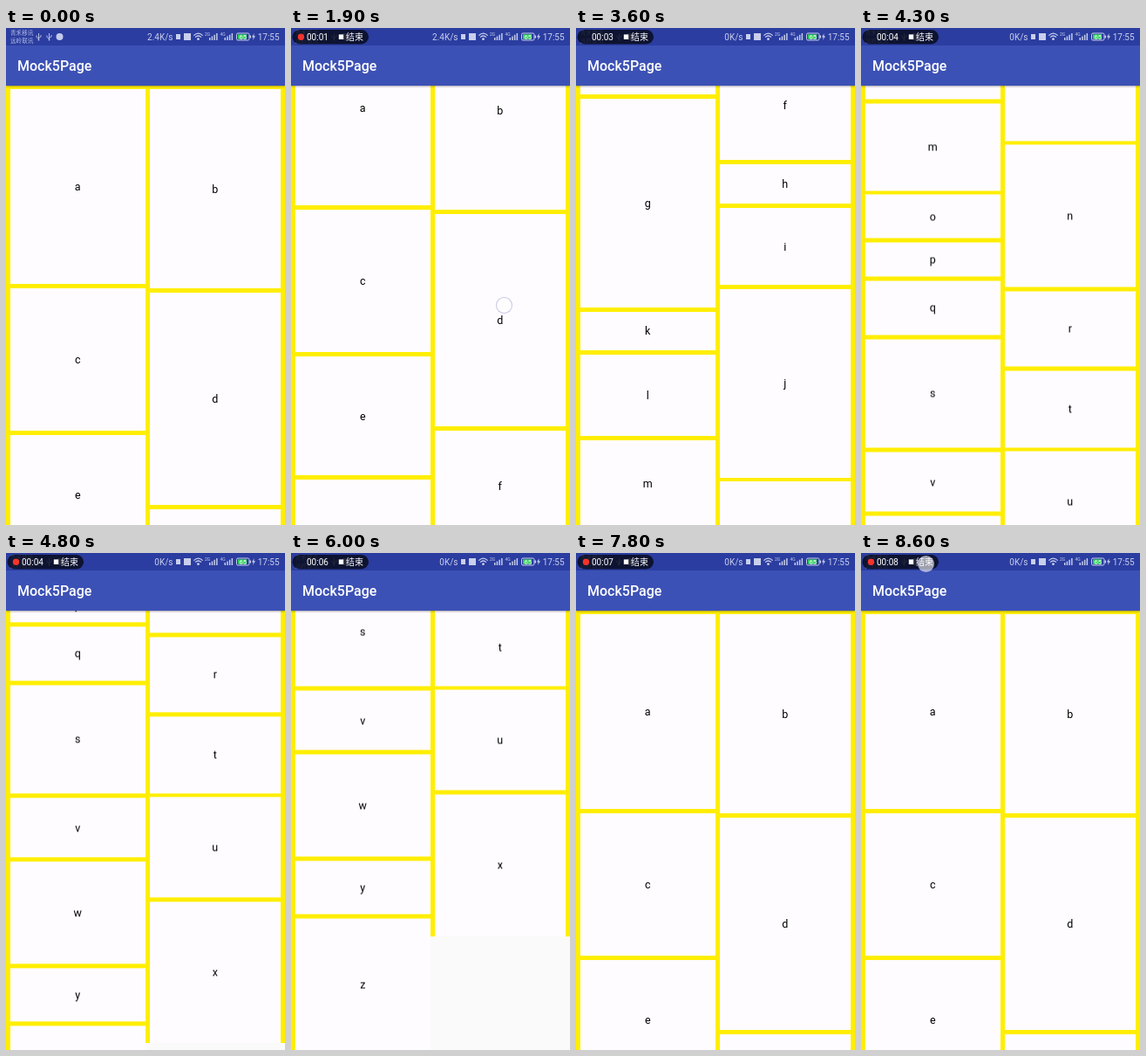
Animation of 320x569 px, one loop 8.7 s. Source, as an HTML page:

```html
<!DOCTYPE html>
<html lang="zh">
<head>
<meta charset="utf-8">
<title>Staggered list</title>
<style>
  html, body { margin: 0; width: 100%; height: 100%; overflow: hidden; }
  #stage {
    position: relative; width: 320px; height: 569px; overflow: hidden;
    background: #fafafa; font-family: Roboto, "Noto Sans", sans-serif;
  }
  #list { position: absolute; inset: 0; will-change: transform; }
  .column { position: absolute; top: 66px; background: #ffee00; }
  .card {
    position: absolute; display: flex; align-items: center; justify-content: center;
    background: #fefcff; color: #000; font-size: 12.5px;
  }
  #bar {
    position: absolute; left: 0; top: 0; width: 320px; height: 65.5px;
    background: #3c51b5; box-shadow: 0 1px 2px rgba(0, 0, 0, .35);
  }
  #bar h1 {
    position: absolute; left: 13px; top: 33.5px; margin: 0;
    font-size: 16px; line-height: 20px; font-weight: 500; color: #fff;
  }
  #status { position: absolute; left: 0; top: 0; }
  #status text { font-family: Roboto, "Noto Sans CJK SC", "Noto Sans CJK", sans-serif; }
  #touch {
    position: absolute; left: -10px; top: -10px; width: 17px; height: 17px;
    border: 1.5px solid rgba(165, 158, 205, .6); border-radius: 50%;
    background: rgba(255, 255, 255, .6);
  }
</style>
</head>
<body>
<div id="stage">
  <div id="list"></div>
  <div id="bar"><h1>Mock5Page</h1></div>
  <svg id="status" width="320" height="20" viewBox="0 0 320 20">
    <defs>
      <g id="fork" fill="none" stroke="#c3caea" stroke-width=".9">
        <path d="M0 -4V4M-2.5 -1.5V.5L0 2.5M2.5 -2V0L0 1.5"/>
        <circle cy="3.6" r=".9" fill="#c3caea" stroke="none"/>
      </g>
      <path id="bars" fill="#c3caea" d="M0 11h1.5v3H0zM2.7 9.5h1.5V14H2.7zM5.4 7.7h1.5V14H5.4zM8.1 6h1.5v8H8.1z"/>
    </defs>
    <rect width="320" height="20" fill="#2b3da0"/>
    <g fill="#b3bce2" font-size="6.6">
      <text x="5" y="8.4">青禾移讯</text>
      <text x="5" y="17">远岭联讯</text>
    </g>
    <use href="#fork" x="37.5" y="10"/>
    <use href="#fork" x="49.5" y="10"/>
    <circle cx="61.5" cy="10" r="4" fill="#c3caea"/>

    <g fill="#c9cfec">
      <text id="speed" x="191.5" y="13.6" font-size="10" text-anchor="end"></text>
      <rect x="195" y="7" width="5" height="6"/>
      <rect x="204" y="6" width="8" height="8"/>
      <g fill="none" stroke="#c9cfec" stroke-width="1.2">
        <path d="M215.3 8.6Q220.5 3.8 225.7 8.6M217 10.6Q220.5 7.4 224 10.6"/>
      </g>
      <circle cx="220.5" cy="12.7" r="1.4"/>
      <text x="228" y="9.4" font-size="5">2G</text>
      <text x="245.5" y="9.4" font-size="5">4G</text>
      <use href="#bars" x="233" y="0"/>
      <use href="#bars" x="250.5" y="0"/>
      <rect x="264.5" y="6" width="14.5" height="8" rx="1.5" fill="#2b3da0" stroke="#c9cfec"/>
      <rect x="266" y="7.3" width="10" height="5.4" fill="#2fd45a"/>
      <rect x="279.5" y="8.5" width="1.5" height="3"/>
      <text x="271.8" y="12.9" font-size="7.5" fill="#fff" text-anchor="middle">65</text>
      <path d="M284.6 6L282 10.6H283.8L283 14L286 9.2H284.2Z"/>
      <text x="288.7" y="13.6" font-size="10">17:55</text>
    </g>

    <g id="recorder">
      <rect x="1.5" y="2" width="87.5" height="16.5" rx="8.25" fill="#080b1c" fill-opacity=".84"/>
      <circle id="dot" cx="11.5" cy="10.3" r="3.7" fill="#f5342b"/>
      <g fill="#fff" font-size="10">
        <text id="timer" x="18" y="13.9"></text>
        <rect x="54.8" y="7.4" width="5.4" height="5.6"/>
        <text x="63" y="13.9">结束</text>
      </g>
    </g>
  </svg>
  <div id="touch"></div>
</div>
<script>
const LOOP = 8700, STEP = 100, GAP = 4.8, TOP = 66;
const $ = id => document.getElementById(id);

// Card tops per column; the last value closes the column.
const columns = [
  { x: 0, width: 160, right: 0, names: 'acegklmopqsvwyz',
    tops: [70, 298, 466, 607, 851, 899.5, 998, 1102.4, 1157, 1201.2, 1267.6, 1397.2, 1470, 1592, 1657.6, 1814] },
  { x: 160, width: 160, right: 5, names: 'bdfhijnrtux',
    tops: [70, 302.8, 551, 682, 731.8, 825.3, 1045.4, 1212.5, 1303.8, 1396.4, 1515.5, 1682.3] }
];

function box(parent, className, left, top, width, height) {
  const el = document.createElement('div');
  el.className = className;
  Object.assign(el.style, { left: left + 'px', top: top + 'px', width: width + 'px', height: height + 'px' });
  return parent.appendChild(el);
}

for (const { x, width, right, names, tops } of columns) {
  const column = box($('list'), 'column', x, TOP, width, tops.at(-1) - GAP - TOP);
  [...names].forEach((name, i) => {
    const height = tops[i + 1] - tops[i] - GAP;
    box(column, 'card', 4.5, tops[i] - TOP, width - 4.5 - right, height).textContent = name;
  });
}

// Pairs of time and scroll offset.
const scrollPath = [
  [1200, 0], [1300, 4], [1500, 25], [1900, 90], [2300, 220], [2800, 360], [3200, 430],
  [3600, 526], [3900, 700], [4300, 911.5], [4700, 1080], [5000, 1190], [5300, 1239.5],
  [6600, 1239.5], [6700, 1225], [6900, 1120], [7200, 880], [7300, 590], [7400, 270],
  [7500, 10], [7600, 0]
];
const ticks = [0, 1000, 2100, 3200, 4200, 5000, 6000, 7300, 8100];

function along(path, t) {
  const i = path.findIndex(p => p[0] > t);
  if (i < 0) return path.at(-1)[1];
  if (i === 0) return path[0][1];
  const [t0, a] = path[i - 1], [t1, b] = path[i];
  return a + (b - a) * (t - t0) / (t1 - t0);
}

function touchAt(t, scroll) {
  if (t >= 1300 && t <= 2000) return [236 + 9 * (t - 1300) / 600, 408 - scroll, 1];
  if (t >= 6700 && t <= 7200) {
    const k = (t - 6700) / 500;
    return [240 + 22 * k, 150 + 263 * k, t < 7200 ? 1 : .55];
  }
  if (t >= 8500) return [75, 13, 1];
  return [0, 0, 0];
}

function draw() {
  const t = Math.floor(performance.now() % LOOP / STEP) * STEP;
  const scroll = along(scrollPath, t);
  $('list').style.transform = `translateY(${-scroll}px)`;

  const seconds = ticks.findLastIndex(tick => tick <= t);
  $('timer').textContent = '00:0' + seconds;
  $('dot').style.opacity = t - ticks[seconds] >= (seconds === 8 ? 400 : 500) ? 1 : 0;
  $('recorder').style.opacity = t >= 100 ? 1 : 0;
  $('speed').textContent = t < 2600 ? '2.4K/s' : '0K/s';

  const [x, y, alpha] = touchAt(t, scroll);
  $('touch').style.transform = `translate(${x}px, ${y}px)`;
  $('touch').style.opacity = alpha;
  requestAnimationFrame(draw);
}
draw();
</script>
</body>
</html>
```
